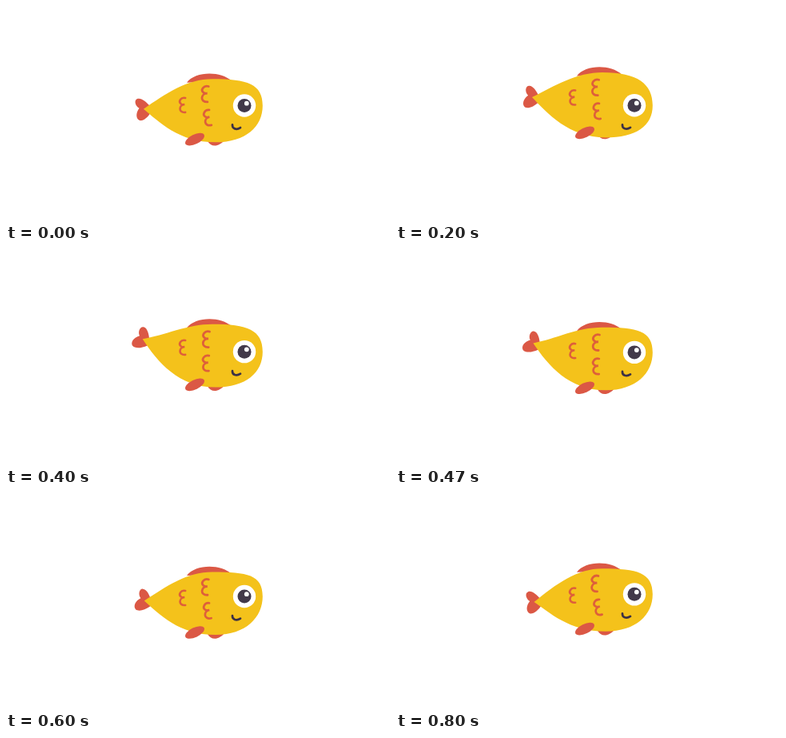
Write an HTML page that moves like this. It is 480 px wide and 270 px high and loops after 870 ms.

```html
<!DOCTYPE html>
<html lang="en">
<head>
<meta charset="utf-8">
<title>Swimming fish</title>
<style>
  html, body { margin: 0; width: 100%; height: 100%; overflow: hidden; background: #fff; }
  svg { display: block; width: 480px; height: 270px; }
  .fin { fill: #db5845; }
  .body { fill: #f4c21b; }
  .scale { fill: none; stroke: #de5f3a; stroke-width: 2.8; stroke-linecap: round; }
  .ink { fill: #42394a; }
  .white { fill: #fff; }
  .mouth { fill: none; stroke: #3c3145; stroke-width: 2.7; stroke-linecap: round; }
</style>
</head>
<body>
<svg viewBox="0 0 480 270">
  <defs>
    <path id="curl" d="M4 -10C-2 -11.5 -6 -5 -2 -2C-1 -1 1 -.8 3 -1.2C-5 -.5 -6 10.5 4 9.5"/>
  </defs>
  <path id="tail" class="fin" d="M8 -3C5 -8 0 -15 -5 -14C-10 -13 -9 -5 -5 -2C-11 3 -12 10 -8 13C-4 15 3 12 9 5Z"/>
  <g id="back" class="fin">
    <path d="M226 11C236 -3 268 -4 282 9Z"/>
    <path d="M252 84C256 92 266 92 274 82Z"/>
  </g>
  <path id="body" class="body"/>
  <use id="scaleA" class="scale" href="#curl"/>
  <use id="scaleB" class="scale" href="#curl"/>
  <use id="scaleC" class="scale" href="#curl"/>
  <g id="side" class="fin">
    <ellipse rx="13" ry="6" transform="translate(236 82) rotate(-26)"/>
  </g>
  <g id="face">
    <circle class="white" r="14.2"/>
    <circle class="ink" r="8.5"/>
    <circle class="white" cx="2.8" cy="-2.8" r="2.9"/>
    <path class="mouth" d="M-15 24C-15.5 29 -10 31 -5 27.6"/>
  </g>
</svg>
<script>
  const LOOP = 870, STEPS = 13;

  const el = id => document.getElementById(id);
  const place = (id, x, y, rot = 0, size = 1) =>
    el(id).setAttribute('transform', `translate(${x} ${y}) rotate(${rot}) scale(${size})`);

  // Cosine that peaks when the angle reaches `peak` (degrees)
  const wave = (size, angle, peak) => size * Math.cos((angle - peak) * Math.PI / 180);

  function bodyPath(x, y, top, bottom, head, bend) {
    const upper = -0.1 - bend * 0.028;
    const lower = 1.6 - bend * 0.037;
    return `M${x} ${y}
      C${x + 28} ${y + 28 * upper} 226 ${top} 258 ${top}
      C302 ${top} 320.8 ${head - 27} 320.8 ${head}
      C320.8 ${head + 26} 300 ${bottom} 262 ${bottom}
      C216 ${bottom} ${x + 19} ${y + 19 * lower} ${x} ${y}Z`;
  }

  function pose(angle) {
    // The second harmonic makes the rise and fall uneven
    const bob = 84.85 + wave(7, angle, 254) + wave(1.9, 2 * angle, 23);
    const x = 171.5 + wave(1.6, angle, 285);
    const y = 123.3 + wave(14.5, angle, 302) + wave(2.4, 2 * angle, 195);
    const head = 126 + wave(2.2, angle, 225);
    const bend = y - bob - 23;
    const bottom = bob + 85 + Math.max(0, 87 - bob) * 0.28;

    el('body').setAttribute('d', bodyPath(x, y, bob + 6.5, bottom, head, bend));
    place('tail', x, y, 6.4 + wave(19, angle, 180));
    place('back', 0, bob);
    place('side', 0, bob);
    place('scaleA', 250 - bend * 0.07, bob + 25.5, 4);
    place('scaleB', 220.5, bob + 35.5 + bend * 0.19, 0, 0.92);
    place('scaleC', 249.5 + bend * 0.1, bob + 55.5, 2 - bend * 0.5, 0.98);
    place('face', 298, head);
  }

  // Poses change on a 10 ms grid, fifteen per second
  const startOf = i => Math.round(i * 20 / 3) * 10;

  let shown = -1;
  function tick() {
    const t = performance.now() % LOOP;
    let i = STEPS - 1;
    while (startOf(i) > t) i--;
    if (i !== shown) pose(360 * (shown = i) / STEPS);
    requestAnimationFrame(tick);
  }
  tick();
</script>
</body>
</html>
```
